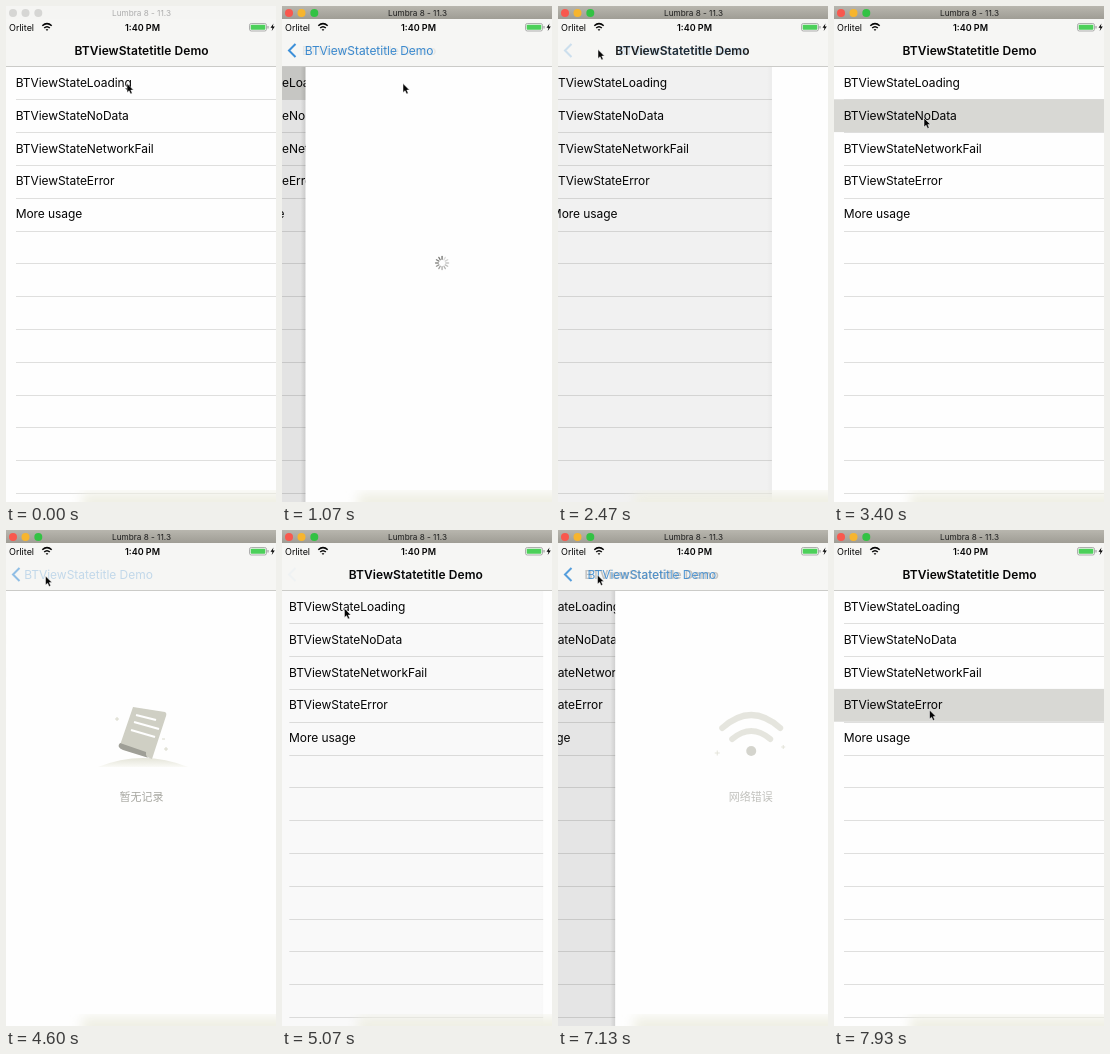
Recreate the animation shown at these times as an HTML page. Size 270 px wide and 496 px high, loop 8000 ms.

```html
<!DOCTYPE html>
<html lang="en">
<head>
<meta charset="utf-8">
<style>
  html, body { margin: 0; width: 100%; height: 100%; overflow: hidden; background: #fefefe; }
  svg { display: block; width: 100vw; height: 100vh; }
  text { font: 12px Inter, "Open Sans", sans-serif; letter-spacing: -.07px; fill: #050505; }
  .mid { text-anchor: middle; }
  .title { font-weight: 600; letter-spacing: .06px; }
  .back { fill: #2a80cc; letter-spacing: -.03px; }
  .status { font-size: 9px; letter-spacing: 0; }
  .clock { font-weight: 600; }
  .bar { font-size: 8.2px; letter-spacing: 0; }
  .note { font: 11px "Noto Sans CJK SC", "Noto Sans CJK", sans-serif; letter-spacing: 0; fill: #a8a8a2; }
</style>
</head>
<body>
<svg viewBox="0 0 270 496" preserveAspectRatio="none">
  <defs>
    <linearGradient id="barFill" x2="0" y2="1">
      <stop stop-color="#b8b6ae"/><stop offset="1" stop-color="#9f9d95"/>
    </linearGradient>
    <linearGradient id="shade">
      <stop stop-opacity="0"/><stop offset="1" stop-opacity=".12"/>
    </linearGradient>
    <linearGradient id="mound" x2="0" y2="1">
      <stop stop-color="#e4e4d8"/><stop offset="1" stop-color="#fafaf6"/>
    </linearGradient>
    <filter id="soft"><feGaussianBlur stdDeviation="6"/></filter>
  </defs>

  <rect width="270" height="496" fill="#fefefe"/>
  <g id="list">
    <g id="lines" stroke="#dfdfde"></g>
    <rect id="row" width="351" height="32.8" fill="#d8d8d4"/>
    <g id="labels"></g>
    <rect id="dim" y="60" width="351" height="436"/>
  </g>

  <g id="page">
    <rect id="edge" x="-5" y="60" width="5" height="436" fill="url(#shade)"/>
    <rect y="60" width="270" height="436" fill="#fefefe"/>
    <g class="view" id="spinner" stroke-width="1.3" stroke-linecap="round" stroke="#70706c"></g>
    <g class="view">
      <path d="M92 237Q137 219 182 237Z" fill="url(#mound)"/>
      <path d="M127 177L159 182Q161 183 160 186L146 229L114 215Z" fill="#cfcfc4"/>
      <path d="M114 213L140 222Q139 228 146 229L117 220Q110 217 114 213Z" fill="#9f9f97"/>
      <path d="M130 185l20 5M128 192l25 7M125 200l24 7" stroke="#fefefe" stroke-width="2.2"/>
      <path d="M109 189h4m-2-2v4M158 219h4m-2-2v4M156 209h3" stroke="#d9d9cc"/>
      <text class="note mid" x="135.5" y="271">暂无记录</text>
    </g>
    <g class="view">
      <g fill="none" stroke="#dcdcd2" stroke-width="6" stroke-linecap="round">
        <path d="M107 198Q136 172 165 198M117 209Q136 193 155 209"/>
      </g>
      <circle cx="136" cy="221" r="5" fill="#c4c4ba"/>
      <path d="M99.500 223h5m-2.500-2.500v5M166 217h4m-2-2v4" stroke="#d9d9cc"/>
      <text class="note mid" x="135.5" y="271">网络错误</text>
    </g>
  </g>

  <rect x="76" y="487" width="230" height="30" fill="#efefe4" filter="url(#soft)"/>
  <rect y="13" width="270" height="47.500" fill="#f6f6f4"/>
  <path d="M0 60.500H270" stroke="#cbcbc8"/>
  <text class="status" x="3" y="24.500">Orlitel</text>
  <g fill="none" stroke="#050505" stroke-width="1.500">
    <path d="M36.300 19.800Q41 15.500 45.700 19.800M38.200 22Q41 19.400 43.800 22"/>
    <path d="M39.600 23.300h2.800L41 25Z" fill="#050505" stroke="none"/>
  </g>
  <text class="status clock mid" x="136.500" y="24.500">1:40 PM</text>
  <rect x="243.500" y="17.500" width="17" height="7.500" rx="1.800" fill="none" stroke="#909090" stroke-width=".7"/>
  <rect x="244.700" y="18.700" width="14.600" height="5.100" rx=".8" fill="#4cd05a"/>
  <path d="M262 20v2.500" stroke="#909090"/>
  <path d="M267.500 17.500L264.500 21.700H266.500L265.700 25L268.800 20.600H266.800Z" fill="#050505"/>
  <text id="title" class="title mid" y="48.700">BTViewStatetitle Demo</text>
  <text id="back" class="back mid" y="48.700">BTViewStatetitle Demo</text>
  <path id="chevron" d="M13.500 38L7 44.500L13.500 51" fill="none" stroke="#2a86d6" stroke-width="2"/>

  <rect id="bar" width="270" height="13"/>
  <g id="lights"><circle cx="7" cy="7" r="4"/><circle cx="19.500" cy="7" r="4"/><circle cx="32.300" cy="7" r="4"/></g>
  <text id="barText" class="bar mid" x="135.500" y="9.800">Lumbra 8 - 11.3</text>

  <path id="cursor" d="M0 0V9L2.100 7.200L3.600 10.500L5.200 9.800L3.800 6.600H6.500Z" fill="#050505" stroke="#fefefe" stroke-width=".5"/>
</svg>
<script>
const $ = id => document.getElementById(id);
const set = (el, attrs) => { for (const k in attrs) el.setAttribute(k, attrs[k]); };
const clamp = v => Math.max(0, Math.min(1, v));
const rowY = i => 60.5 + 32.8 * i;

$('labels').innerHTML = ['Loading', 'NoData', 'NetworkFail', 'Error']
  .map(s => 'BTViewState' + s).concat('More usage')
  .map((s, i) => `<text x="9.700" y="${rowY(i) + 20.4}">${s}</text>`).join('');
$('lines').innerHTML = Array.from({ length: 13 }, (_, i) =>
  `<path d="M10 ${Math.round(rowY(i + 1)) + .5}H351"/>`).join('');
$('spinner').innerHTML = Array.from({ length: 12 }, (_, i) =>
  `<path d="M0 -3.700V-6.500" transform="translate(136.500 257) rotate(${i * 30})"/>`).join('');

const views = [...document.querySelectorAll('.view')];
const blades = [...$('spinner').children];
const lights = [...$('lights').children];

// press on a row, press on the back button, start of the way back
const visits = [
  { tap: 730, hold: 2110, pop: 2258 },
  { tap: 3400, hold: 4470, pop: 4640 },
  { tap: 5730, hold: 6930, pop: 7080 },
  { tap: 7930 }
];
// start, end, x, y
const moves = [
  [0, 0, 121, 77.5], [1400, 2000, 40, 43.5], [2500, 3130, 90, 112],
  [3650, 4330, 39.5, 46], [4800, 5470, 103.5, 136.5],
  [6200, 6750, 39.5, 45], [7300, 7840, 95.5, 180]
];

// overdamped spring
const spring = ms => {
  const t = Math.max(0, ms) / 1000, a = 8.5, b = 40;
  return 1 - (b * Math.exp(-a * t) - a * Math.exp(-b * t)) / (b - a);
};

function draw(t) {
  const n = visits.findLastIndex(v => t >= v.tap);
  const v = visits[n];
  let p = 0;
  if (v && v.pop) p = t < v.pop ? spring(t - v.tap - 26) : 1 - spring(t - v.pop);
  if (p < .0015) p = 0;

  set($('list'), { transform: `translate(${-81 * p})` });
  set($('dim'), { opacity: .11 * Math.sqrt(p) });
  set($('row'), { y: rowY(Math.max(n, 0)), opacity: v ? 1 - clamp((t - v.tap - 300) / 300) : 0 });
  set($('page'), { transform: `translate(${270 * (1 - p)})`, visibility: p ? 'visible' : 'hidden' });
  set($('edge'), { opacity: p });
  views.forEach((el, i) => set(el, {
    display: i === n ? 'inline' : 'none',
    opacity: n ? clamp((p - .4) / .55) : 1
  }));
  const step = Math.floor(t / 1000 * 12);
  blades.forEach((el, i) => set(el, { opacity: 1 - .75 * ((step - i + 12) % 12) / 11 }));

  const held = v && t >= v.hold && t < v.pop;
  const x = 135.5 - 53 * p;
  set($('title'), { x, opacity: clamp(1.15 - p * 1.2) });
  set($('back'), { x, opacity: held ? .25 : p });
  set($('chevron'), { opacity: held ? .5 : p });

  const active = t >= 730;
  set($('bar'), { fill: active ? 'url(#barFill)' : '#f5f5f3' });
  lights.forEach((el, i) => set(el, { fill: active ? ['#f9584e', '#f7b52e', '#33c244'][i] : '#d6d6d4' }));
  $('barText').style.fill = active ? '#1c1c1c' : '#acacac';

  let [, , cx, cy] = moves[0];
  for (const [from, to, mx, my] of moves.slice(1)) {
    const k = clamp((t - from) / (to - from)), e = k * k * (3 - 2 * k);
    cx += (mx - cx) * e;
    cy += (my - cy) * e;
  }
  set($('cursor'), { transform: `translate(${cx} ${cy})` });
}

function loop() {
  draw(performance.now() % 8000);
  requestAnimationFrame(loop);
}
loop();
</script>
</body>
</html>
```
